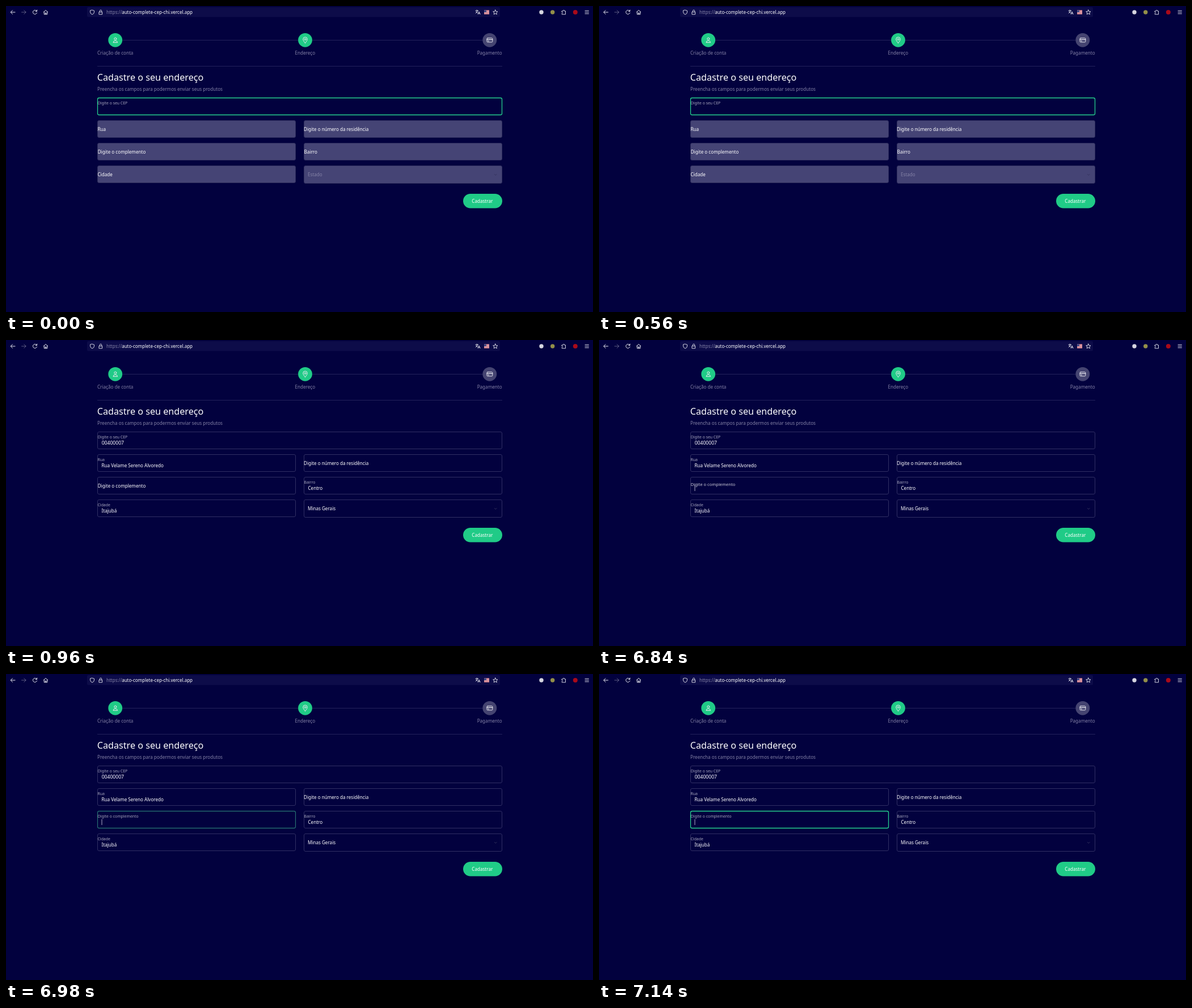
These frames come from a looping animation (1035 by 541 pixels, 8 s). An HTML page:

```html
<!DOCTYPE html>
<html lang="pt-BR">
<head>
<meta charset="utf-8">
<title>Cadastre o seu endereço</title>
<style>
  html, body { margin: 0; width: 100%; height: 100%; overflow: hidden; background: #02013e; }
  svg { display: block; width: 100%; height: 100%; }
  text { font: 8.1px "Noto Sans", "Open Sans", sans-serif; fill: #fff; white-space: pre; }
  .muted { fill: #8482a6; }
  .small { font-size: 6.9px; fill: #a6a6bc; }
  .digits { font-size: 8.6px; }
  .icon { fill: none; stroke: #e8e8f0; stroke-width: 1; stroke-linecap: round; stroke-linejoin: round; }
  .field { fill: none; stroke: #302f63; }
  .disabled { fill: #454475; stroke: #302f5f; }
  .focus { fill: none; stroke: #25d18d; stroke-width: 1.3; }
  .rule { stroke: #22215a; }
  .green { fill: #20cb87; }
</style>
</head>
<body>
<svg id="stage" viewBox="0 0 1035 541" preserveAspectRatio="none">
  <g id="toolbar">
    <rect x="143" y="2" width="728" height="17.5" rx="2.5" fill="#0d0c49"/>
    <g class="icon">
      <path d="M16 11H8.3M11.5 7.7L8.2 11l3.3 3.3"/>
      <path d="M27.5 11h7.5M31.8 7.7L35.1 11l-3.3 3.3" opacity=".38"/>
      <path d="M54 8.8A3.6 3.6 0 1 0 54.5 12M54.6 7v2.4h-2.4"/>
      <path d="M66.4 10.8L70 7.4l3.6 3.4M67.2 10.2v4.5h5.6v-4.5M69.2 14.5v-2.3h1.6v2.3"/>
      <path d="M152 7.2l3.5 1.1v2.5q0 2.8-3.5 4.3q-3.5-1.5-3.5-4.3v-2.5z" stroke-width=".9"/>
      <path d="M164.3 10.6h5.4v4.2h-5.4zM165.3 10.4V8.8a1.7 1.7 0 0 1 3.4 0v1.6" stroke-width=".9"/>
      <path d="M862.8 6.9l1.2 2.7 2.9.3-2.2 2 .7 2.9-2.6-1.5-2.6 1.5.7-2.9-2.2-2 2.9-.3z" stroke-width=".9"/>
      <path d="M980.2 9h2a1.3 1.3 0 1 1 2.5 0h1.8v5.8h-6.3v-1.7a1.4 1.4 0 0 0 0-2.7z" stroke-width=".9"/>
      <path d="M1021 8.3h6.4M1021 11h6.4M1021 13.7h6.4" stroke-width=".9"/>
      <path d="M828 8.2h4.6M830.2 7v1.2M832 8.3q-.8 3-3.8 4.3M828.8 9.6q1 2 2.8 2.8M832.2 14.6l1.9-4.6 1.9 4.6M832.9 13.2h2.4" stroke-width=".9"/>
    </g>
    <rect x="843" y="7.5" width="9" height="7" fill="#e9dfe2"/>
    <path d="M843 8h9M843 10h9M843 12h9M843 14h9" stroke="#c8475a"/>
    <rect x="843" y="7.5" width="4" height="3.5" fill="#414a85"/>
    <circle cx="944" cy="11" r="3.7" fill="#d6d6e0"/>
    <circle cx="963.7" cy="11" r="3.7" fill="#938f49"/>
    <circle cx="1003.8" cy="11" r="4" fill="#a90a19"/>
  </g>

  <g id="steps">
    <path class="rule" d="M205 60.5H515M540 60.5H841M161 106.5H875"/>
    <circle class="green" cx="192.7" cy="60.3" r="12.4"/>
    <circle class="green" cx="527.5" cy="60.3" r="12.4"/>
    <circle cx="852.8" cy="60.3" r="12.4" fill="#454471"/>
    <g class="icon" stroke-width=".9">
      <circle cx="192.8" cy="58" r="2"/>
      <path d="M189 64.2q.3-3 3.8-3t3.8 3z"/>
      <path d="M527.5 65.6q-3.8-4.6-3.8-6.8a3.8 3.8 0 0 1 7.6 0q0 2.2-3.8 6.8z"/>
      <circle cx="527.5" cy="58.9" r="1.5"/>
      <rect x="848" y="56.7" width="9.8" height="7.2" rx="1.2"/>
      <path d="M848 59.3h9.8M850 61.8h1.2" stroke-width="1.2"/>
    </g>
  </g>

  <g id="labels"></g>
  <g id="empty"></g>
  <g id="filled"></g>
  <path d="M861 297.1l2.2 2.2 2.2-2.2" fill="none" stroke="#34335f"/>
  <rect class="green" x="806" y="332" width="69" height="25.5" rx="12.75"/>
  <text x="821.3" y="347.8">Cadastrar</text>
</svg>
<script>
const LOOP = 8000, FILL = 960, CLICK = 6840;
const LEFT = 161.5, RIGHT = 525.5, HALF = 349, FULL = 713;
const ROWS = [162.5, 202.5, 242.5, 282.5];
const byId = id => document.getElementById(id);

function add(parent, tag, attrs, content = '') {
  const node = document.createElementNS('http://www.w3.org/2000/svg', tag);
  for (const key in attrs) node.setAttribute(key, attrs[key]);
  node.textContent = content;
  return parent.appendChild(node);
}
const write = (parent, x, y, content, cls = '') =>
  add(parent, 'text', { x, y, class: cls }, content);
const box = (parent, x, y, width, cls, height = 30) =>
  add(parent, 'rect', { x, y, width, height, rx: 2.5, class: cls });

// Hard changes: each entry is [time in ms, style].
function timeline(node, entries) {
  const frames = entries.map(([time, style]) =>
    ({ ...style, offset: time / LOOP, easing: 'step-end' }));
  frames.push({ ...entries[entries.length - 1][1], offset: 1 });
  node.animate(frames, { duration: LOOP, iterations: Infinity });
}

const labels = byId('labels'), empty = byId('empty'), filled = byId('filled');

write(labels, 177, 14, 'https://', 'muted').style.fontSize = '8px';
write(labels, 204.2, 14, 'auto-complete-cep-chi.vercel.app').style.fontSize = '8px';
write(labels, 161, 85.8, 'Criação de conta', 'muted');
write(labels, 509.5, 85.8, 'Endereço', 'muted');
write(labels, 830.7, 85.8, 'Pagamento', 'muted');
write(labels, 160.8, 132, 'Cadastre o seu endereço').style.fontSize = '16.15px';
write(labels, 161, 150, 'Preencha os campos para podermos enviar seus produtos', 'muted');
write(labels, 161.7, 174.1, 'Digite o seu CEP', 'small');

box(empty, LEFT, ROWS[0], FULL, 'focus');
box(filled, LEFT, ROWS[0], FULL, 'field');
for (const y of ROWS.slice(1)) {
  for (const x of [LEFT, RIGHT]) {
    const height = y === ROWS[3] && x === RIGHT ? 31 : 30;
    box(empty, x, y, HALF, 'disabled', height);
    box(filled, x, y, HALF, 'field', height);
  }
}

write(filled, 168.7, 185.2, '00400007', 'digits');
const answers = [
  [LEFT, ROWS[1], 'Rua', 'Rua Velame Sereno Alvoredo'],
  [RIGHT, ROWS[2], 'Bairro', 'Centro'],
  [LEFT, ROWS[3], 'Cidade', 'Itajubá'],
];
for (const [x, y, label, value] of answers) {
  write(empty, x, y + 18.3, label);
  write(filled, x, y + 11.6, label, 'small');
  write(filled, x + 7, y + 22.6, value);
}
for (const group of [empty, filled]) write(group, 525, 220.8, 'Digite o número da residência');
write(empty, 532, 301.3, 'Estado', 'muted');
write(filled, 532, 301.3, 'Minas Gerais');

const extra = write(labels, 0, 0, 'Digite o complemento');
byId('stage').append(extra);
const caret = add(filled, 'path', { d: 'M169 256.8V267', stroke: '#c4c4d6', 'stroke-width': .9 });
const ring = box(filled, LEFT, ROWS[2], HALF, 'focus');

const place = (y, scale, opacity) =>
  ({ transform: `translate(161.7px, ${y}px) scale(${scale})`, opacity });
const show = opacity => ({ opacity });

timeline(empty, [[0, show(1)], [FILL, show(0)]]);
timeline(filled, [[0, show(0)], [FILL, show(1)]]);
timeline(extra, [
  [0, place(260.8, 1, 1)],
  [CLICK, place(257.6, .93, .8)],
  [6980, place(254.2, .853, .65)],
]);
timeline(caret, [[0, show(0)], [CLICK, show(1)]]);
timeline(ring, [[0, show(0)], [6980, show(.4)], [7060, show(.8)], [7140, show(1)]]);
</script>
</body>
</html>
```
